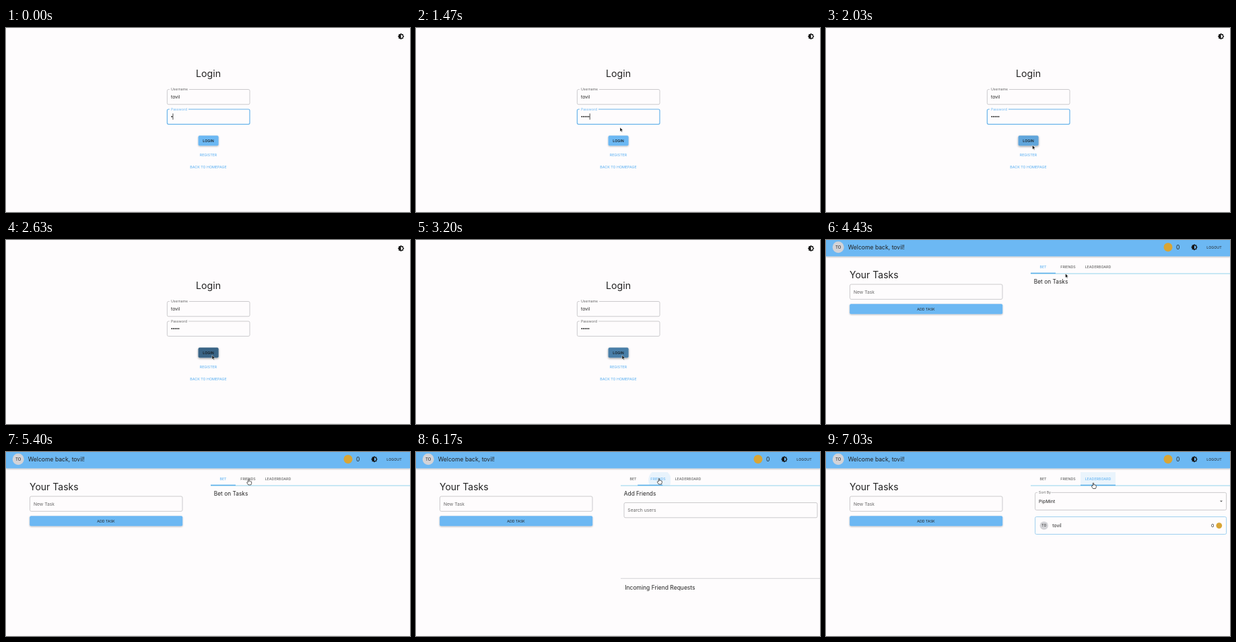
Animation of 600x274 px, one loop 7070 ms. Source, as an HTML page:

```html
<!DOCTYPE html>
<html lang="en">
<head>
<meta charset="utf-8">
<title>Task betting demo</title>
<style>
  html, body { margin: 0; width: 100%; height: 100%; overflow: hidden; background: #fefcfd; }
  svg { display: block; width: 100vw; height: 100vh; }
  text { font-family: Inter, "Open Sans", sans-serif; white-space: pre; }
</style>
</head>
<body>
<svg id="stage" viewBox="0 0 600 274" xmlns="http://www.w3.org/2000/svg"></svg>
<script>
const LOOP = 7070;
const BG = '#fefcfd', BLUE = '#6cb8f3', INK = '#222', GREY = '#666', LINE = '#c6c5c7';
const USER = 'tovil', INITIALS = 'TO';

// Moments of the story, in ms
const TYPED = [300, 540, 770, 1030];
const HOVER = 1960, PRESS = 2330, ENTER = 3500;
const FRIENDS = 6040, BOARD = 6720, ROW = 6860;
const TABS = [[304, 37], [341, 37], [378, 52]];
const PATH = [
  [1080, 302, 146], [1470, 303, 148], [1760, 303.5, 151], [2030, 306.5, 174.5],
  [2230, 306, 171.5], [3850, 306, 171.5], [4430, 355.5, 50], [4680, 356, 50],
  [5050, 360, 41], [5900, 361, 39.5], [6300, 361, 39.5], [6660, 396, 45], [7030, 397, 46]
];

// y is the middle of the capitals
function label(x, y, size, str, { fill = INK, anchor = 'start', weight = 400, id = '' } = {}) {
  return `<text id="${id}" x="${x}" y="${y + size * 0.36}" font-size="${size}" fill="${fill}"
    text-anchor="${anchor}" font-weight="${weight}">${str}</text>`;
}
const caps = (x, y, str, opts) => label(x, y, 5.3, str, { anchor: 'middle', weight: 500, ...opts });

function box(x, y, w, h, { stroke = LINE, id = '' } = {}) {
  return `<rect id="${id}" x="${x}" y="${y}" width="${w}" height="${h}" rx="2"
    fill="none" stroke="${stroke}" stroke-width=".9"/>`;
}
function notched(x, y, w, h, title, gap, id = '') {
  return box(x, y, w, h, { id: id && id + 'Box' }) +
    `<rect x="${x + 3.5}" y="${y - 1}" width="${gap}" height="2" fill="${BG}"/>` +
    label(x + 5.5, y - 0.3, 5.2, title, { fill: GREY, id: id && id + 'Label' });
}
function button(x, y, w, h, id = '') {
  return `<rect id="${id}" x="${x}" y="${y}" width="${w}" height="${h}" rx="2"
    fill="${BLUE}" filter="url(#lift)"/>`;
}
function avatar(x, y, r, size) {
  return `<circle cx="${x}" cy="${y}" r="${r}" fill="#d3d3d7"/>` +
    label(x, y, size, INITIALS, { anchor: 'middle' });
}
const chip = (x, y, r) => `<circle cx="${x}" cy="${y}" r="${r}" fill="#d8a535"/>`;

function themeIcon(x, y, inside) {
  const square = turn => `<rect x="-8" y="-8" width="16" height="16" fill="#151515" transform="rotate(${turn})"/>`;
  return `<g transform="translate(${x} ${y}) scale(.42)">${square(0)}${square(45)}
    <path d="M0-6A6 6 0 0 1 0 6Z" fill="${inside}"/></g>`;
}

const loginPage = `<g id="login">
  ${themeIcon(586.6, 12.5, BG)}
  ${label(300.5, 67.7, 14.2, 'Login', { anchor: 'middle' })}
  ${notched(239.4, 91.5, 122.6, 22.3, 'Username', 29)}
  ${label(245, 102.5, 6.8, USER)}
  ${notched(239.4, 121, 122.6, 22.3, 'Password', 28, 'pass')}
  ${[0, 1, 2, 3, 4].map(i => `<circle class="dot" cx="${246.3 + i * 2.55}" cy="132" r=".95" fill="${INK}"/>`).join('')}
  <rect id="caret" y="127.3" width=".8" height="9.2" fill="${INK}"/>
  ${button(285.6, 160.2, 30, 15, 'go')}
  <circle id="goRipple" cx="306" cy="171.5" fill="#000" clip-path="url(#goClip)"/>
  ${caps(300.5, 167.6, 'LOGIN', { fill: '#111' })}
  ${caps(300.5, 189, 'REGISTER', { fill: BLUE })}
  ${caps(300.5, 207.4, 'BACK TO HOMEPAGE', { fill: BLUE })}
</g>`;

const homePage = `<g id="home">
  <rect width="600" height="24.3" fill="${BLUE}" filter="url(#lift)"/>
  ${avatar(18.2, 10.8, 8.5, 6)}
  ${label(32.8, 10.9, 8.6, `Welcome back, ${USER}!`)}
  ${chip(508, 10.7, 6.5)}
  ${label(520, 10.9, 8.6, '0')}
  ${themeIcon(547, 10.8, BLUE)}
  ${caps(576.5, 10.8, 'LOGOUT', { weight: 400 })}
  ${label(35, 51.8, 14, 'Your Tasks')}
  ${box(35.5, 66, 226.5, 22.3)}
  ${label(41, 77.2, 6.7, 'New Task', { fill: GREY })}
  ${button(35.2, 95.3, 227, 15)}
  ${caps(148.5, 102.8, 'ADD TASK', { weight: 400 })}

  <circle id="tabRipple" fill="${BLUE}"/>
  ${['BET', 'FRIENDS', 'LEADERBOARD'].map((s, i) =>
    caps(TABS[i][0] + TABS[i][1] / 2, 40.4, s, { id: 'tab' + i })).join('')}
  <rect x="304" y="49.6" width="296" height=".9" fill="#85cdea"/>
  <rect id="mark" y="48.7" height="1.4" fill="#5aaeea"/>

  <g id="panel0">${label(308.8, 62.2, 8.35, 'Bet on Tasks')}</g>
  <g id="panel1">
    ${label(308.8, 62.2, 8.35, 'Add Friends')}
    ${box(309, 75.5, 287, 22.3)}
    ${label(314.3, 86.6, 6.8, 'Search users', { fill: GREY })}
    <rect x="304" y="187.8" width="296" height=".9" fill="#cfced0"/>
    ${label(310.3, 201.7, 8.5, 'Incoming Friend Requests')}
  </g>
  <g id="panel2">
    ${notched(310.6, 60.4, 284, 26, 'Sort By', 20.5)}
    ${label(316, 73.3, 6.8, 'PipMint')}
    <path d="M585 72.4h4l-2 2.1z" fill="#555"/>
    <g id="row">
      ${box(310.6, 96.5, 284, 26, { stroke: '#95cbee' })}
      ${avatar(323.8, 109.6, 6.2, 5)}
      ${label(336.3, 109.6, 6.9, USER)}
      ${label(572, 109.6, 6.8, '0')}
      ${chip(583.8, 109.6, 4.4)}
    </g>
  </g>
</g>`;

const pointer = `<g id="cursor" stroke-linejoin="round">
  <path id="arrow" d="M0 0V8L1.9 6.3 3.1 9 4.4 8.5 3.2 5.8H5.7Z" transform="scale(.78)"
    fill="#111" stroke="#fff" stroke-width=".6"/>
  <path id="hand" d="M-.7 4.5V.7Q-.7 0 0 0T.7.7V3Q1.4 2.5 2 3.2 2.7 2.8 3.2 3.5 4.2 3.2 4.3 4.3V6.2L3.4 8.5H-.5L-2.6 5.3Q-2.8 4.3-1.8 4.2Z"
    fill="#fff" stroke="#222" stroke-width=".75"/>
</g>`;

const stage = document.getElementById('stage');
stage.innerHTML = `<defs>
  <filter id="lift" x="-20%" y="-30%" width="140%" height="190%">
    <feDropShadow dx="0" dy=".9" stdDeviation=".9" flood-color="#000" flood-opacity=".32"/>
  </filter>
  <filter id="lift2" x="-20%" y="-30%" width="140%" height="190%">
    <feDropShadow dx="0" dy="1.2" stdDeviation="1.4" flood-color="#000" flood-opacity=".42"/>
  </filter>
  <linearGradient id="edge">
    <stop offset="0" stop-color="#ddd" stop-opacity="0"/><stop offset=".2" stop-color="#ddd"/>
    <stop offset=".8" stop-color="#ddd"/><stop offset="1" stop-color="#ddd" stop-opacity="0"/>
  </linearGradient>
  <clipPath id="goClip"><rect x="285.6" y="160.2" width="30" height="15" rx="2"/></clipPath>
  ${[1, 2].map(i => `<clipPath id="tabClip${i}"><rect x="${TABS[i][0]}" y="30" width="${TABS[i][1]}" height="20"/></clipPath>`).join('')}
</defs>
<rect width="600" height="274" fill="${BG}"/>
<rect y="273.2" width="600" height=".8" fill="url(#edge)"/>
${loginPage}${homePage}${pointer}`;

const $ = id => document.getElementById(id);
const set = (id, attrs) => { for (const k in attrs) $(id).setAttribute(k, attrs[k]); };
const show = (el, on) => { el.style.display = on ? '' : 'none'; };
const clamp = v => Math.min(1, Math.max(0, v));
const mix = (a, b, p) => a + (b - a) * p;

// cubic-bezier(.4, 0, .2, 1)
function ease(x) {
  let lo = 0, hi = 1;
  for (let i = 0; i < 20; i++) {
    const s = (lo + hi) / 2, q = 1 - s;
    if (1.2 * q * q * s + 0.6 * q * s * s + s ** 3 < x) lo = s; else hi = s;
  }
  return 3 * (1 - lo) * lo * lo + lo ** 3;
}

function place(t) {
  let i = 1;
  while (i < PATH.length - 1 && t > PATH[i][0]) i++;
  const [a, b] = [PATH[i - 1], PATH[i]];
  const p = clamp((t - a[0]) / (b[0] - a[0])), s = p * p * (3 - 2 * p);
  return [mix(a[1], b[1], s), mix(a[2], b[2], s)];
}

function drawLogin(t) {
  const count = 1 + TYPED.filter(m => t >= m).length;
  document.querySelectorAll('.dot').forEach((d, i) => show(d, i < count));

  const last = Math.max(0, ...TYPED.filter(m => t >= m));
  const focus = t < PRESS;
  show($('caret'), focus && Math.floor((t - last) / 510) % 2 === 0);
  set('caret', { x: 245 + count * 2.55 });
  set('passBox', { stroke: focus ? '#69b4ea' : LINE, 'stroke-width': focus ? 1.2 : 0.9 });
  set('passLabel', { fill: focus ? BLUE : GREY });

  const h = ease(clamp((t - HOVER) / 250));
  const rgb = [[108, 72], [184, 126], [243, 168]].map(c => Math.round(mix(c[0], c[1], h)));
  set('go', { fill: `rgb(${rgb})`, filter: h > 0 ? 'url(#lift2)' : 'url(#lift)' });

  const dt = t - PRESS;
  set('goRipple', { r: 30 * ease(clamp(dt / 550)), opacity: dt < 0 ? 0 : 0.25 * (1 - clamp((dt - 200) / 550)) });
}

function drawHome(t) {
  const tab = t < FRIENDS ? 0 : t < BOARD ? 1 : 2;
  const since = t - [0, FRIENDS, BOARD][tab];
  TABS.forEach((_, i) => {
    set('tab' + i, { fill: i === tab ? BLUE : GREY });
    show($('panel' + i), i === tab);
  });
  show($('row'), t >= ROW);

  const from = TABS[Math.max(0, tab - 1)], to = TABS[tab], p = ease(clamp(since / 300));
  set('mark', { x: mix(from[0], to[0], p), width: mix(from[1], to[1], p) });

  show($('tabRipple'), tab > 0);
  if (tab > 0) set('tabRipple', {
    cx: tab === 1 ? 362 : 397, cy: 42, r: 80 * ease(clamp(since / 550)),
    opacity: 0.15 * (1 - clamp((since - 250) / 550)), 'clip-path': `url(#tabClip${tab})`
  });
}

function draw(t) {
  const home = t >= ENTER;
  show($('login'), !home);
  show($('home'), home);
  (home ? drawHome : drawLogin)(t);

  const [x, y] = place(t), link = home && y < 49;
  show($('cursor'), t >= PATH[0][0]);
  show($('arrow'), !link);
  show($('hand'), link);
  set('cursor', { transform: `translate(${x} ${y})` });
}

const start = performance.now();
function tick() {
  draw((performance.now() - start) % LOOP);
  requestAnimationFrame(tick);
}
tick();
</script>
</body>
</html>
```
